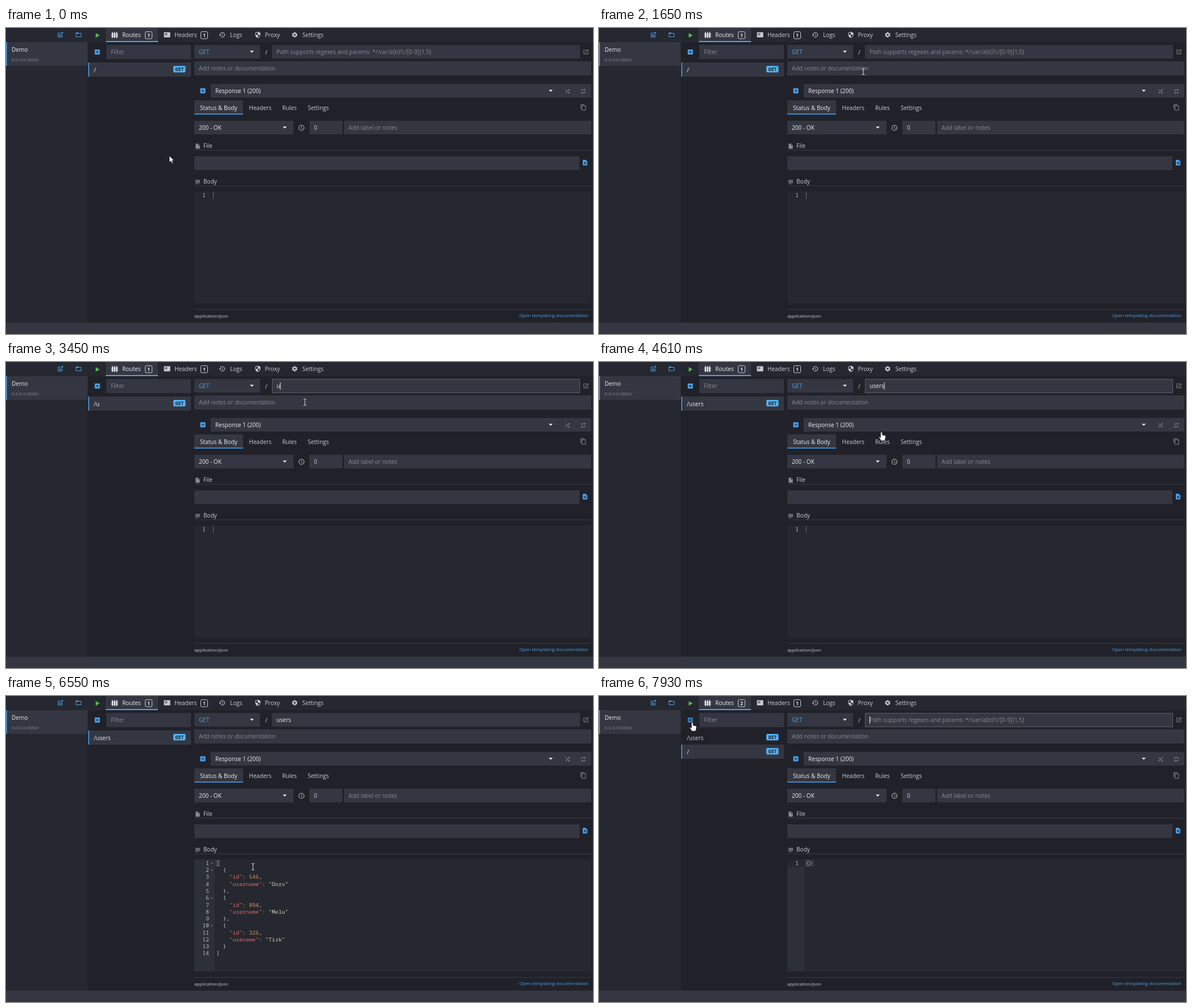
Recreate the animation shown at these times as an HTML page. Size 1035 by 541 pixels, loop 8000 ms.

```html
<!DOCTYPE html>
<html lang="en">
<head>
<meta charset="utf-8">
<title>API mock editor</title>
<style>
  html, body { margin: 0; width: 100%; height: 100%; overflow: hidden; background: #212229; }
  svg { display: block; width: 1035px; height: 541px; }
  text { font: 10.1px "Open Sans", "Noto Sans", sans-serif; white-space: pre; }
  .small { font-size: 8px; }
  .bold { font-weight: 700; font-size: 8px; }
  .code { font: 9.6px "Noto Sans Mono", "DejaVu Sans Mono", monospace; }
</style>
</head>
<body>
<svg id="stage" viewBox="0 0 1035 541"></svg>
<script>
const LOOP = 8000;
const C = {
  bar: '#252830', field: '#343741', editor: '#25282e', gutter: '#2c3037', line: '#393c45',
  text: '#c9cdd5', bright: '#eceef2', muted: '#858a95', blue: '#4ba3f0', border: '#5b606c'
};

const ICONS = {
  add: 'M19 3H5a2 2 0 00-2 2v14a2 2 0 002 2h14a2 2 0 002-2V5a2 2 0 00-2-2zM17 13h-4v4h-2v-4H7v-2h4V7h2v4h4z',
  note: 'M3 5h10v2H5v12h12v-8h2v10H3zM17 1h2v3h3v2h-3v3h-2V6h-3V4h3zM7 11h8v2H7zM7 15h8v2H7z',
  folder: 'M20 6h-8l-2-2H4a2 2 0 00-2 2v12a2 2 0 002 2h16a2 2 0 002-2V8a2 2 0 00-2-2zM20 18H4V8h16z',
  play: 'M6 3v18l15-9z',
  fence: 'M3 6l2-4 2 4v3h3V6l2-4 2 4v3h3V6l2-4 2 4v3h2v2h-2v4h2v2h-2v5h-4v-5h-3v5h-4v-5H7v5H3v-5H1v-2h2v-4H1V9h2zM7 11v4h3v-4zM14 11v4h3v-4z',
  card: 'M1 3h22v18H1zM4 7h9v2H4zM4 11h9v2H4z',
  history: 'M13 3a9 9 0 00-9 9H1l4 4 4-4H6a7 7 0 117 7c-1.9 0-3.7-.8-4.9-2l-1.4 1.4A9 9 0 1013 3zM12 8v5l4.3 2.5.7-1.2-3.5-2V8z',
  shield: 'M12 1L3 5v6c0 5.6 3.8 10.7 9 12 5.2-1.3 9-6.4 9-12V5zM12 12h7c-.5 4.1-3.3 7.8-7 8.9V12H5V6.3l7-3.1z',
  gear: 'M19.4 13a7.5 7.5 0 000-2l2.1-1.6-2-3.5-2.5 1a7.5 7.5 0 00-1.7-1L14.9 3H9.1l-.4 2.9a7.5 7.5 0 00-1.7 1l-2.5-1-2 3.5L4.6 11a7.5 7.5 0 000 2l-2.1 1.6 2 3.5 2.5-1a7.5 7.5 0 001.7 1l.4 2.9h5.8l.4-2.9a7.5 7.5 0 001.7-1l2.5 1 2-3.5zM12 15.5a3.5 3.5 0 110-7 3.5 3.5 0 010 7z',
  external: 'M19 19H5V5h7V3H3v18h18v-9h-2zM14 3v2h3.6l-9.8 9.8 1.4 1.4L19 6.4V10h2V3z',
  shuffle: 'M10.6 9.2L5.4 4 4 5.4l5.2 5.2zM14.5 4l2 2L4 18.6 5.4 20 18 7.5l2 2V4zM14.8 13.4l-1.4 1.4 3.1 3.2-2 2H20v-5.5l-2 2z',
  repeat: 'M7 7h10v3l4-4-4-4v3H5v6h2zM17 17H7v-3l-4 4 4 4v-3h12v-6h-2z',
  copy: 'M16 1H4a2 2 0 00-2 2v14h2V3h12zM19 5H8a2 2 0 00-2 2v14a2 2 0 002 2h11a2 2 0 002-2V7a2 2 0 00-2-2zM19 21H8V7h11z',
  clock: 'M12 2a10 10 0 100 20 10 10 0 000-20zM12 20a8 8 0 110-16 8 8 0 010 16zM12.5 7H11v6l5.2 3.2.8-1.3-4.5-2.7z',
  file: 'M6 2a2 2 0 00-2 2v16a2 2 0 002 2h12a2 2 0 002-2V8l-6-6zM13 9V3.5L18.5 9z',
  find: 'M6 2a2 2 0 00-2 2v16a2 2 0 002 2h12a2 2 0 002-2V8l-6-6zM12 9a4 4 0 013.4 6.1l2.6 2.6-1.4 1.4-2.6-2.6A4 4 0 1112 9zM12 11a2 2 0 100 4 2 2 0 000-4z',
  lines: 'M2 4h20v3H2zM2 9h20v3H2zM2 14h20v3H2zM2 19h14v2H2z'
};

const CURSORS = {
  arrow: '<path d="M0 0v11.5l2.7-2.5 1.9 4.3 2-.9-1.9-4.1h3.6z" fill="#fff" stroke="#111" stroke-width=".7"/>',
  hand: '<path d="M-1.4 1.3a1.4 1.4 0 012.8 0V5l5 1q1.2.4 1 2l-.8 4.5-1 2.5H-.6l-3.4-5q-.6-1.6 1-1.4l1.6 1.2z" fill="#fff" stroke="#111" stroke-width=".6"/>',
  beam: '<path d="M-2.5-5.5h2l.5.5.5-.5h2M0-5V5M-2.5 5.5h2L0 5l.5.5h2" fill="none" stroke="#dcdfe4"/>'
};

// Pointer moves: first step, last step, number of steps, x, y
const MOVES = [
  [930, 1290, 5, 388, 155], [1380, 1650, 4, 466, 77], [1750, 2110, 5, 490.5, 46],
  [2470, 2800, 4, 527, 71], [4430, 4430, 1, 520, 84], [4610, 4610, 1, 498, 124],
  [4695, 5110, 6, 435.5, 302], [6640, 7240, 8, 154, 42], [7840, 7930, 2, 164.5, 47]
];
const SHAPES = [
  [0, 'arrow'], [1380, 'hand'], [1470, 'arrow'], [1650, 'beam'], [4430, 'arrow'], [4610, 'hand'],
  [4695, 'arrow'], [5030, 'beam'], [6640, 'arrow'], [7150, 'hand']
];
const CLICKS = [2290, 5390, 7400];
const KEYS = [3450, 3610, 3880, 4070, 4340];
const PASTE = 5940, ADD_ROUTE = 7490;

const JSON_LINES = ['['];
[['id": 546', 'username": "Dorv'], ['id": 894', 'username": "Melu'], ['id": 326', 'usename": "Tisk']]
  .forEach(([id, name], i) =>
    JSON_LINES.push('  {', `    "${id},`, `    "${name}"`, i < 2 ? '  },' : '  }'));
JSON_LINES.push(']');

const within = (t, a, b) => t >= a && t < b;
const rect = (x, y, w, h, fill, more = '') =>
  `<rect x="${x}" y="${y}" width="${w}" height="${h}" fill="${fill}" ${more}/>`;
const outline = (x, y, w, h, color = C.border) =>
  rect(x + .5, y + .5, w - 1, h - 1, 'none', `stroke="${color}"`);
const label = (x, y, s, fill = C.text, cls = '', more = '') =>
  `<text x="${x}" y="${y + (cls ? 2.9 : 3.7)}" fill="${fill}" class="${cls}" ${more}>${s}</text>`;
const icon = (name, x, y, size, fill = C.text) =>
  `<path transform="translate(${x - size / 2} ${y - size / 2}) scale(${size / 24})" fill="${fill}" fill-rule="evenodd" d="${ICONS[name]}"/>`;
const chevron = (x, y, s = 3.5, fill = C.bright) =>
  `<path d="M${x - s} ${y - s / 2}h${2 * s}l${-s} ${s}z" fill="${fill}"/>`;
const field = (x, y, w, h, s = '', fill = C.muted) =>
  rect(x, y, w, h, C.field) + label(x + 8, y + h / 2, s, fill);
const badge = (x, n) =>
  `<rect x="${x - 6}" y="6.5" width="12" height="12.5" rx="2" fill="none" stroke="${C.text}"/>` +
  label(x, 13, n, C.bright, 'bold', 'text-anchor="middle"');

const pen = document.createElement('canvas').getContext('2d');
function textWidth(s) {
  pen.font = '10.1px "Open Sans", "Noto Sans", sans-serif';
  return pen.measureText(s).width;
}

function topBar(routeCount) {
  return rect(0, 0, 1035, 25, C.bar) + rect(0, 25, 144, 496, C.bar) + rect(0, 521, 1035, 20, C.field) +
    rect(0, 25, 144, 42, C.field) + rect(0, 25, 1.5, 42, C.blue) +
    label(10, 38, 'Demo', C.bright) + label(10, 56, '0.0.0.0:3000/', C.muted, 'small') +
    icon('note', 96, 12, 12, C.blue) + icon('folder', 128, 12, 12, C.blue) + icon('play', 161, 13, 11, '#55bd4c') +
    rect(176, 0, 92, 25, C.field) + rect(176, 23, 92, 2, C.blue) +
    icon('fence', 191.5, 12, 13, C.bright) + label(205, 12.5, 'Routes', C.bright) + badge(251.5, routeCount) +
    icon('card', 284, 12, 12) + label(297, 12.5, 'Headers') + badge(349.5, 1) +
    icon('history', 381, 12, 12) + label(395, 12.5, 'Logs') +
    icon('shield', 444, 12, 12) + label(456.5, 12.5, 'Proxy') +
    icon('gear', 509, 12, 12) + label(522.5, 12.5, 'Settings');
}

function route(y, path, selected) {
  return (selected ? rect(145, y, 181, 25, C.field) + rect(145, y, 1.5, 25, C.blue) : '') +
    label(155, y + 12.8, path, selected ? C.bright : C.text) +
    rect(295, y + 6, 21.5, 11.5, '#51b1f6', 'rx="2"') +
    label(305.7, y + 11.8, 'GET', '#20242b', 'bold', 'text-anchor="middle"');
}

function responsePanel(t) {
  return icon('add', 347, 111, 12, C.blue) + field(361, 99, 671, 24, 'Response 1 (200)', C.bright) +
    chevron(960.5, 111) + icon('shuffle', 990, 112, 11, C.muted) + icon('repeat', 1018, 112, 11, C.muted) +
    rect(332, 128, 86, 25, C.field) + rect(332, 151.5, 86, 1.5, C.blue) +
    label(342, 141, 'Status &amp; Body', C.bright) + label(428.5, 141, 'Headers') +
    label(487, 141, 'Rules') + label(532, 141, 'Settings') + icon('copy', 1018, 140.5, 12, C.muted) +
    field(332, 164, 175, 24, '200 - OK', C.bright) + chevron(491.5, 176) +
    icon('clock', 521, 176.5, 12) + field(535, 164, 58, 24, '0', C.text) + field(596, 164, 436, 24, 'Add label or notes') +
    icon('file', 338, 209, 11, C.muted) + label(348, 208.5, 'File') + rect(332, 215.5, 700, 1, C.line) +
    field(332, 227, 679, 24) + icon('find', 1021, 238, 12, C.blue) +
    icon('lines', 338, 272, 10, C.muted) + label(348, 271.5, 'Body') + rect(332, 278.5, 700, 1, C.line) +
    (within(t, 1200, 1380) ? outline(332, 163, 176, 26) : '') +
    (within(t, 1470, 1560) ? outline(361, 98, 615, 26) : '') +
    rect(332, 497, 700, 1, C.line) + label(332, 509.5, 'application/json', C.text, 'small') +
    label(1027, 508.5, 'Open templating documentation', C.blue, 'small', 'text-anchor="end"');
}

const highlight = s => s.replace(/("\w+")(?=:)|("\w+")|(\d+)/g, (m, key, str) =>
  `<tspan fill="${key ? '#dc6870' : str ? '#cbcebf' : '#d6935c'}">${m}</tspan>`);

function editor(t) {
  const added = t >= ADD_ROUTE;
  const lines = added ? ['{}'] : t >= PASTE ? JSON_LINES : [''];
  const long = lines.length > 1, gutter = long ? 36 : 30;
  const left = 332 + gutter + 3, pitch = 12.27, advance = 5.76;
  let out = rect(332, 289, 700, 198, C.editor);
  if (lines[0]) out += rect(332, 289, gutter, 198, C.gutter) + outline(left - 1, 290, 7, 11);
  if (added) out += rect(332, 289, gutter, 13, C.editor);
  lines.forEach((s, i) => {
    const y = 296 + i * pitch, code = s.trimStart();
    out += label(322 + gutter, y, i + 1, '#b9bec8', 'code', 'text-anchor="end"') +
      label(left + (s.length - code.length) * advance, y, highlight(code), '#bcc2cd', 'code');
    if (long && /[[{]/.test(s)) out += chevron(363, y, 1.8, C.muted);
  });
  const last = lines.length - 1, focused = within(t, 5390, ADD_ROUTE);
  if (!within(t, 6550, 7070))
    out += rect(left + lines[last].length * advance, 290 + last * pitch, 1, 12, focused ? '#dfe2e8' : '#666b75');
  return out;
}

function pointer(t) {
  let x = 288, y = 226;
  for (const [first, last, n, toX, toY] of MOVES) {
    if (t < first) break;
    const step = Math.floor((t - first) * (n - 1) / (last - first) + 1e-6) || 0;
    const k = Math.min(1, (step + 1) / n);
    x += (toX - x) * k;
    y += (toY - y) * k;
  }
  const shape = SHAPES.filter(s => s[0] <= t).pop()[1];
  const ring = CLICKS.some(c => within(t, c, c + 85))
    ? '<circle r="6.5" fill="none" stroke="#fff"/>' : '';
  return `<g transform="translate(${x.toFixed(1)} ${y.toFixed(1)})">${ring}${CURSORS[shape]}</g>`;
}

function scene(t) {
  const added = t >= ADD_ROUTE;
  const typed = 'users'.slice(0, KEYS.filter(k => k <= t).length);
  const path = added ? '' : typed;
  const focused = within(t, 2290, 5390) || added;
  const caret = focused && !within(t, 2800, 3360) && !within(t, 4880, 5390);
  return rect(0, 0, 1035, 541, '#212229') + topBar(added ? 2 : 1) +
    icon('add', 161, 42.5, 12, t >= 7240 ? '#327ab9' : C.blue) + field(177, 30, 149, 25, 'Filter') +
    route(61, '/' + typed, !added) + (added ? route(86, '/', true) : '') +
    field(332, 30, 116, 24, 'GET', C.blue) + chevron(433.5, 42) + label(457, 43, '/') +
    (path ? field(469, 30, 543, 24, path, C.bright)
          : field(469, 30, 543, 24, 'Path supports regexes and params: */:var/a(b)?c/[0-9]{1,5}')) +
    (focused ? outline(469, 30, 543, 25) : '') +
    (caret ? rect(477 + textWidth(path), 36, 1, 13, C.bright) : '') +
    icon('external', 1022.5, 42, 11, C.muted) + field(332, 59, 700, 25, 'Add notes or documentation') +
    responsePanel(t) + editor(t) +
    (within(t, 7240, 7660)
      ? rect(136, 8, 50, 18, '#131419', 'rx="2"') + label(161, 17, 'Add route', C.bright, '', 'text-anchor="middle" style="font-size:8.8px"')
      : '') +
    pointer(t);
}

const stage = document.getElementById('stage');
let shown = '';
function draw() {
  const markup = scene(performance.now() % LOOP);
  if (markup !== shown) stage.innerHTML = shown = markup;
  requestAnimationFrame(draw);
}
draw();
</script>
</body>
</html>
```
